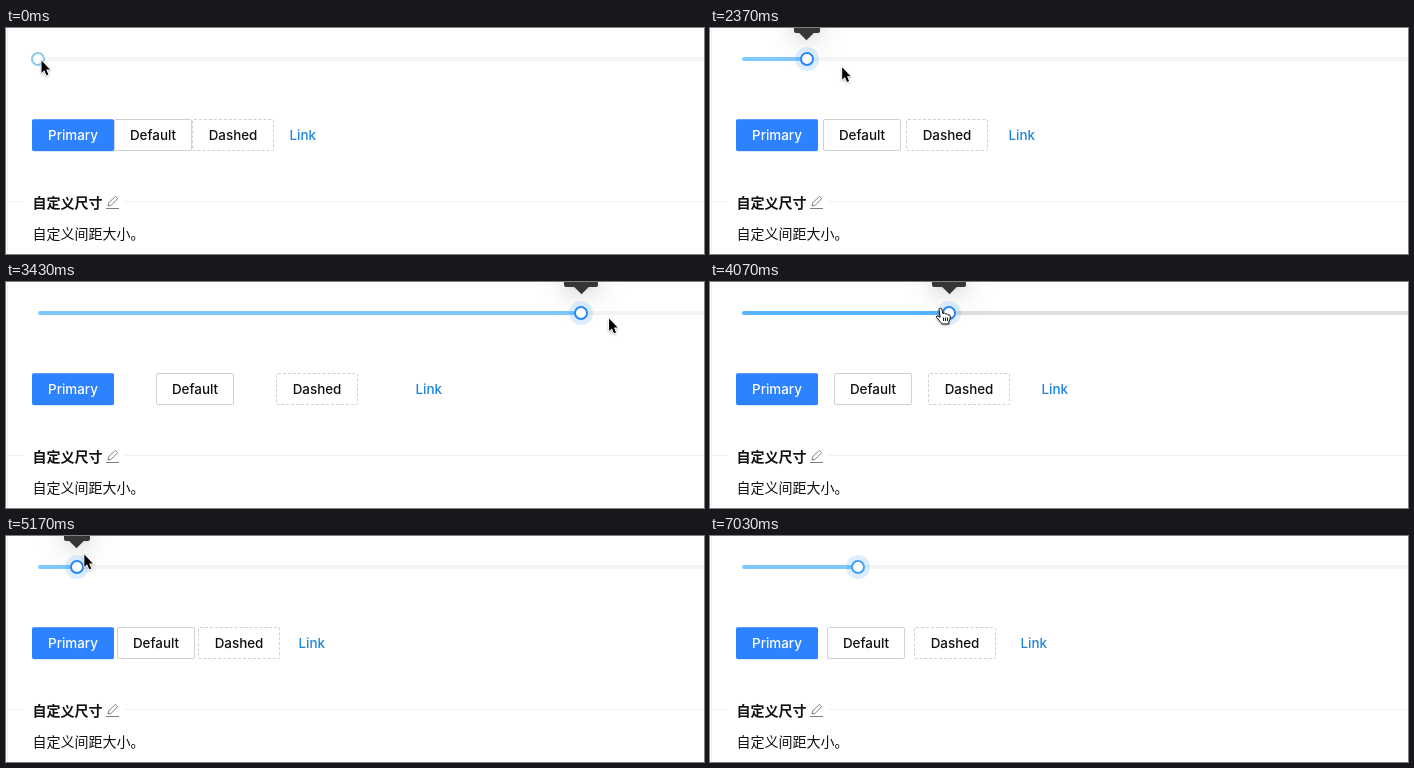
Recreate the animation shown at these times as an HTML page. Size 698 by 226 pixels, loop 7830 ms.

```html
<!DOCTYPE html>
<html lang="zh">
<head>
<meta charset="utf-8">
<style>
  html, body { margin: 0; width: 100%; height: 100%; overflow: hidden; background: #fff; }
  body { position: relative; font: 14px/22px Inter, "Noto Sans CJK SC", "Noto Sans CJK", sans-serif; color: #111; }
  body > *, #tip::after { position: absolute; box-sizing: border-box; white-space: nowrap; }
  .edge { left: 1px; top: 0; width: 1px; height: 100%; background: #f0f0f0; }
  .divider { left: 2px; right: 0; top: 173px; height: 1px; background: linear-gradient(90deg, #f0f0f0 16px, #fff 16px 117px, #f0f0f0 117px); }
  .title { left: 26.5px; top: 164px; font-weight: 600; }
  .note { left: 26.5px; top: 195px; }
  .edit { left: 99px; top: 167px; }
  #rail, #track { left: 32px; top: 29px; height: 4px; border-radius: 2px; }
  #rail { right: -10px; }
  #handle { top: 24px; width: 14px; height: 14px; margin-left: -7px; border: 2px solid; border-radius: 50%; background: #fff; }
  #tip { top: -27px; height: 32px; border-radius: 2px; background: #363636; transform: translateX(-50%);
    box-shadow: 0 3px 6px -4px #0000001f, 0 6px 16px #00000014, 0 9px 28px 8px #0000000d; }
  #tip::after { content: ""; left: 50%; top: 26px; width: 11px; height: 11px; margin-left: -5.5px; background: #363636; transform: rotate(45deg); }
  #row { left: 26px; top: 91px; display: flex; font-size: 13.4px; font-weight: 500; }
  #row span { box-sizing: border-box; width: 82px; height: 32px; border: 1px solid #d0d0d0; border-radius: 2px; line-height: 30px; text-align: center; }
  #row .primary { background: #2d82ff; border-color: #5b9dff #2d82ff #2d82ff; color: #fff; box-shadow: 0 1px #d9e8ff; }
  #row .default { width: 78px; }
  #row .dashed { border-style: dashed; }
  #row .link { width: auto; padding: 0 14.5px; border-color: transparent; color: #1d84e2; }
  #cursor { left: 0; top: 0; overflow: visible; filter: drop-shadow(0 1px 1px #0004); }
</style>
</head>
<body>
<div class="edge"></div>
<div class="divider"></div>
<div class="title">自定义尺寸</div>
<svg class="edit" width="15" height="15" fill="none" stroke="#7d7d7d"><path d="M1 13.5H14M3 11L3.6 8L10.3 1.3L12.7 3.7L6 10.4Z"/></svg>
<div class="note">自定义间距大小。</div>
<div id="row">
  <span class="primary">Primary</span><span class="default">Default</span><span class="dashed">Dashed</span><span class="link">Link</span>
</div>
<div id="rail"></div>
<div id="track"></div>
<div id="tip"></div>
<div id="handle"></div>
<svg id="cursor" width="20" height="20" stroke-linejoin="round">
  <path id="arrow" d="M.5 .5V13L3.3 10.3L5.4 15.2L7.4 14.4L5.3 9.5H9Z" stroke="#fff" paint-order="stroke" stroke-width="1.6"/>
  <path id="hand" d="M-2 1.6Q-1.8 .2 -.5 .3Q.7 .4 1 1.8L1.8 5.5Q3.6 4.4 4.6 6Q6.2 5.2 7 6.8Q8.8 6.4 9.2 8.2Q9.6 11 8 13L7.6 16H1Q-.5 14.5 -1.8 12.4L-4.6 9.4Q-5 7.6 -3 8L-1 9.4ZM2.4 9.5V13M4.4 9.5V13M6.4 9.5V13" fill="#fff" stroke="#111"/>
</svg>
<script>
const LOOP = 7830, START = 32, STEP = 12.94;
const PRESS = 1570, RELEASE = 6800;

// Turning points of the drag: time, gap between the buttons
const drag = [[1700, 0], [2300, 5], [3626, 44], [4070, 16], [4330, 44], [4720, 3], [5170, 3], [5800, 45], [6150, 2], [6340, 11], [6650, 9]];
// Pointer: time, offset from the handle, height
const pointer = [[770, 3, 32], [1470, 17, 32], [1700, 4, 33], [2930, 52, 43], [4070, -8, 26], [5170, 7, 18], [5800, 6, 39]];

const ramp = (t, from, to) => Math.min(1, Math.max(0, (t - from) / (to - from)));

// Cosine easing from each key to the next
function follow(keys, t, column = 1) {
  return keys.reduce((value, key, i) => {
    if (i === 0) return key[column];
    const u = ramp(t, keys[i - 1][0], key[0]);
    return value + (key[column] - keys[i - 1][column]) * (1 - Math.cos(Math.PI * u)) / 2;
  }, 0);
}

const el = id => document.getElementById(id).style;
const [rail, track, handle, tip, row, cursor, arrow, hand] =
  ["rail", "track", "handle", "tip", "row", "cursor", "arrow", "hand"].map(el);
const pulse = (t, on, off) => ramp(t, on, on + 200) - ramp(t, off, off + 200);
const mix = (a, b, p) => `color-mix(in srgb, ${b} ${p * 100}%, ${a})`;

function draw(t) {
  const exact = follow(drag, t), gap = Math.round(exact), x = START + STEP * gap;
  const hover = pulse(t, 800, 1700) + pulse(t, 3800, 4150);

  row.gap = gap + "px";
  rail.background = mix("#f4f4f4", "#dfdfdf", hover);
  track.background = mix("#7fc9ff", "#58b2ff", hover);
  track.width = x - START + "px";

  handle.left = tip.left = x + "px";
  handle.borderColor = t < 800 ? "#8ccbe8" : t < PRESS ? "#4aa8f5" : t < RELEASE ? "#2b86f8" : "#469ff0";
  handle.boxShadow = `0 0 0 5px rgba(24, 144, 255, ${0.15 * ramp(t, 770, 1000)})`;
  tip.width = gap > 9 ? "34px" : "26px";
  tip.opacity = pulse(t, PRESS, RELEASE);

  cursor.transform = `translate(${START + STEP * exact + follow(pointer, t)}px, ${follow(pointer, t, 2)}px)`;
  cursor.display = t < 7020 ? "" : "none";
  arrow.display = hover > 0.1 ? "none" : "";
  hand.display = hover > 0.1 ? "" : "none";
}

const begin = performance.now();
function tick() {
  draw((performance.now() - begin) % LOOP);
  requestAnimationFrame(tick);
}
tick();
</script>
</body>
</html>
```
